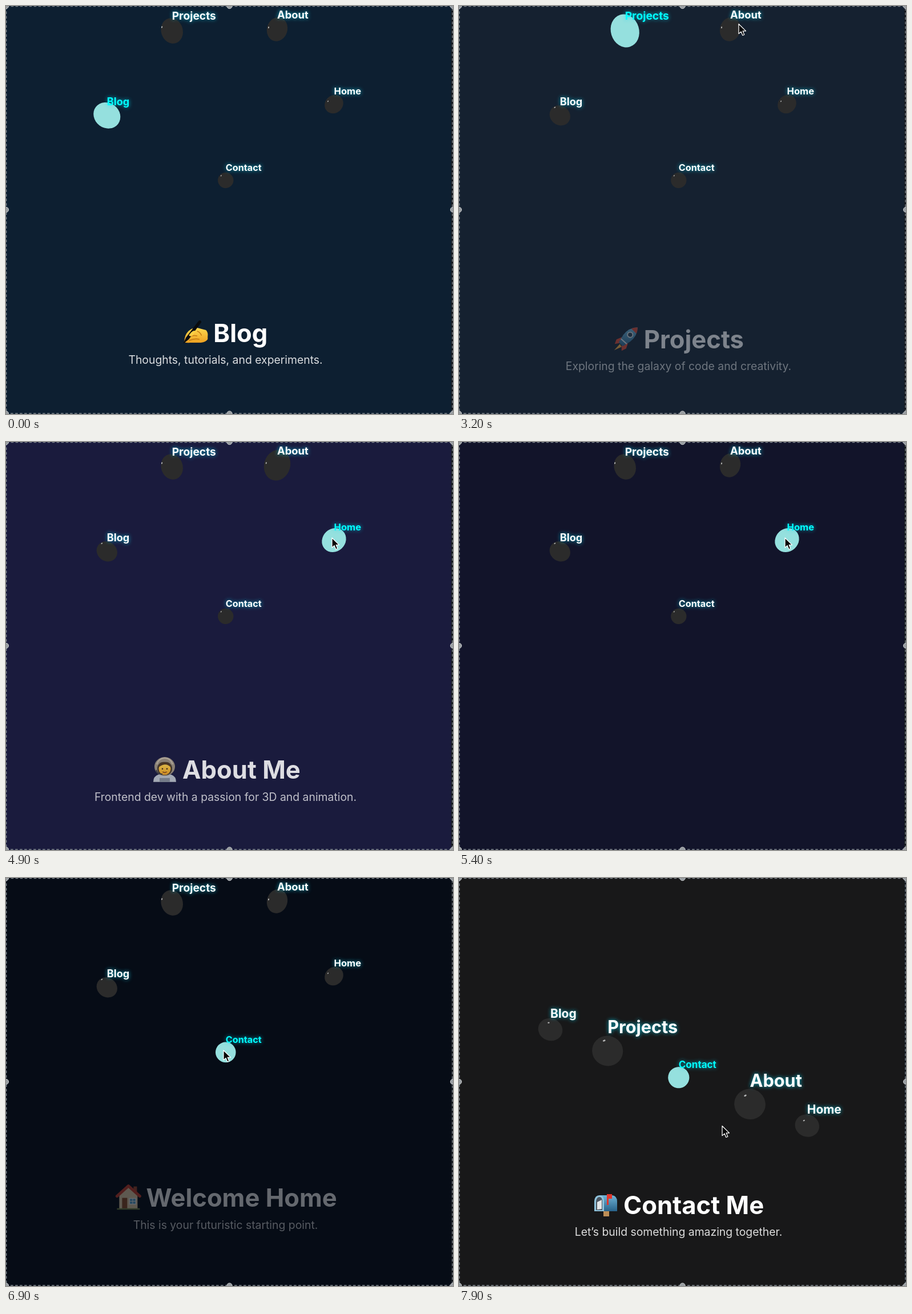
Write an HTML page that moves like this. It is 783 px wide and 715 px high and loops after 8000 ms.

```html
<!DOCTYPE html>
<html lang="en">
<head>
<meta charset="utf-8">
<title>Orbit menu</title>
<style>
  html, body { margin: 0; width: 100%; height: 100%; overflow: hidden; background: #0d1f31; }
  svg { display: block; width: 100vw; height: 100vh; }
  text { font-family: Inter, "Open Sans", sans-serif; font-optical-sizing: none; }
  .label { font-weight: 700; filter: drop-shadow(0 0 3.5px rgba(0, 225, 255, .7)); }
  .title { font-weight: 700; font-size: 43.6px; fill: #fff; }
  .sub { font-size: 19.36px; fill: #fff; fill-opacity: .85; text-anchor: middle; }
</style>
</head>
<body>
<svg id="stage" viewBox="0 0 783 715">
  <defs>
    <linearGradient id="skin" x1="0" y1="0" x2="0" y2="1">
      <stop offset="0" stop-color="#ffd94f"/><stop offset="1" stop-color="#eda021"/>
    </linearGradient>
    <linearGradient id="steel" x1="0" y1="0" x2="0" y2="1">
      <stop offset="0" stop-color="#6fb4d6"/><stop offset="1" stop-color="#28628a"/>
    </linearGradient>

    <g id="hand">
      <path d="M-20 17Q-20 5-13-2Q-6-9 3-8L18-4Q22 0 21 7V12Q18 17 9 18H-10Q-16 19-20 17Z" fill="url(#skin)"/>
      <path d="M-13 9Q-5 4 2 6M-11 14Q-2 10 6 12M3-2Q8 0 10 5" fill="none" stroke="#c67c15" stroke-width="1.6" stroke-linecap="round"/>
      <path d="M5-20Q9-23 10-18L-12 12L-22 20L-17 9Z" fill="#090b0e"/>
      <path d="M-8 0Q-3-5 0-2L-6 6Q-10 8-12 5Z" fill="#ffcf45"/>
    </g>

    <g id="rocket">
      <path d="M-5-4L-17 1L-20 9L-9 7ZM4 5L0 17L-8 21L-8 10Z" fill="#d8432f"/>
      <path d="M-11 9L-21 20L-8 14Z" fill="#f2a63b"/>
      <path d="M20-20Q5-20-5-7L-13 6L-6 13L7 5Q20-5 20-20Z" fill="url(#steel)"/>
      <path d="M20-20Q14-20 9-18L18-9Q20-14 20-20Z" fill="#d8432f"/>
      <path d="M-9 0L1 9" stroke="#d8dde0" stroke-width="2"/>
      <circle cx="7" cy="-7" r="4.6" fill="#273b4d" stroke="#d8dde0" stroke-width="1.8"/>
    </g>

    <g id="astronaut">
      <path d="M-20 22Q-20 12-11 9H11Q20 12 20 22Z" fill="#bcc2c9"/>
      <path d="M-9 15H9V22H-9Z" fill="#858d97"/>
      <ellipse cy="-5" rx="18" ry="16.5" fill="#9d927f"/>
      <path d="M-14-9Q-10-20 0-20T14-9" fill="none" stroke="#c4b9a4" stroke-width="2.4"/>
      <rect x="-13" y="-13" width="26" height="23" rx="11" fill="#4b3d2c"/>
      <ellipse cy="-1" rx="10.5" ry="10.5" fill="url(#skin)"/>
      <path d="M-10-4Q-9-12 0-12T10-4Q6-9 0-8.5T-10-4Z" fill="#53391f"/>
      <circle cx="-4" cy="-1" r="1.3" fill="#3b2914"/><circle cx="4" cy="-1" r="1.3" fill="#3b2914"/>
      <path d="M-3.5 4Q0 7 3.5 4" fill="none" stroke="#8a4b18" stroke-width="1.5"/>
      <path d="M-15 1Q-13 9-4 8" fill="none" stroke="#3a3d41" stroke-width="1.8"/>
    </g>

    <g id="house">
      <rect x="9" y="-19" width="6" height="13" fill="#a5492f"/>
      <path d="M-16 20V-4L0-17L16-4V20Z" fill="#f0d9b0"/>
      <path d="M-20-2L0-20L20-2" fill="none" stroke="#d0402d" stroke-width="5" stroke-linejoin="round" stroke-linecap="round"/>
      <rect x="-11" y="1" width="9" height="19" fill="#914f2b"/>
      <rect x="2" y="2" width="11" height="10" fill="#59abd9" stroke="#fff" stroke-width="1.4"/>
      <path d="M7.5 2V12M2 7H13" stroke="#fff"/>
      <path d="M-20 20.5H20" stroke="#77864a" stroke-width="2.5"/>
    </g>

    <g id="mailbox">
      <rect x="-4" y="10" width="10" height="11" fill="#bd8d55"/>
      <path d="M-11-16H11Q20-15 20-5V12H-11Z" fill="url(#steel)"/>
      <path d="M-20 12V-6Q-19-16-11-16T-3-6V12Z" fill="#8fc3dc"/>
      <path d="M-17 10V-5Q-16-13-11-13T-6-5V10Z" fill="#4b5560"/>
      <path d="M-15 9V-4L-7-8V8Z" fill="#e3e6e8"/>
      <path d="M2 1V-18H11V-10H5V1Z" fill="#e2352b"/>
    </g>
  </defs>

  <rect id="bg" width="783" height="715"/>
  <g id="nodes"></g>
  <g id="pages"></g>
  <g id="frame">
    <path d="M781.5 0V715" stroke="#14181d" stroke-width="3"/>
    <rect x=".7" y=".7" width="781.3" height="713.3" fill="none" stroke="#7d858c" stroke-width="1.3" stroke-dasharray="4.5 3.5"/>
  </g>
  <path id="cursor" d="M0 0V18L4.3 14.2L7.2 21L10.3 19.7L7.5 13H13.2Z" fill="#050505" stroke="#fff" stroke-width="1.3" stroke-linejoin="round"/>
</svg>
<script>
const LOOP = 8000, CX = 385, CY = 350;
const byId = id => document.getElementById(id);
const lerp = (a, b, u) => a + (b - a) * u;
const progress = (t, start, length) => Math.min(1, Math.max(0, (t - start) / length));
const ease = u => u * u * (3 - 2 * u);

function add(parent, tag, attrs, text = "") {
  const el = document.createElementNS("http://www.w3.org/2000/svg", tag);
  set(el, attrs);
  el.textContent = text;
  return parent.appendChild(el);
}
function set(el, attrs) {
  for (const key in attrs) el.setAttribute(key, attrs[key]);
}

// Pose: x, y, radius, label size, highlight offset; before and after the orbit drag.
const nodes = [
  { name: "Projects", on: 1750, off: 3950, from: [290.7, 43.5, 19, 19.2, -17.6, -6.5], to: [260.2, 303, 26.3, 30.6, -6, -18] },
  { name: "About", on: 3280, off: 4870, from: [475, 40.7, 17.9, 18.4, -15, -3], to: [509.5, 396.3, 26.6, 30.7, -8, -15] },
  { name: "Blog", on: -999, off: 2450, from: [176.8, 191.8, 16.8, 18.1, -9, -14], to: [160, 265.6, 19.5, 21, -3, -12] },
  { name: "Home", on: 4680, off: 6610, from: [574.5, 172, 15.3, 16.6, -10.5, -5], to: [609.8, 434, 19.5, 20.9, -5.5, -9] },
  { name: "Contact", on: 6000, off: 9999, from: [384.8, 305.4, 13.7, 16.2, -8, -8], to: [384.8, 349.7, 14.3, 17, -5, -8] }
];

const pages = [
  { icon: "hand", title: "Blog", sub: "Thoughts, tutorials, and experiments.", x: 363.3, enter: -999, exit: 2450 },
  { icon: "rocket", title: "Projects", sub: "Exploring the galaxy of code and creativity.", x: 323.8, enter: 2970, exit: 3950 },
  { icon: "astronaut", title: "About Me", sub: "Frontend dev with a passion for 3D and animation.", x: 309, enter: 4460, exit: 4850 },
  { icon: "house", title: "Welcome Home", sub: "This is your futuristic starting point.", x: 245.4, enter: 5500, exit: 6610 },
  { icon: "mailbox", title: "Contact Me", sub: "Let’s build something amazing together.", x: 288, enter: 7130, exit: 9999 }
];

const backdrop = [
  [0, 13, 31, 49], [2450, 13, 31, 49], [3200, 21, 33, 48], [3600, 25, 35, 49], [3950, 25, 35, 49],
  [4800, 26, 27, 61], [4900, 26, 27, 61], [5800, 11, 14, 27], [6200, 5, 11, 21], [6650, 5, 11, 21],
  [6900, 6, 12, 22], [7600, 24, 24, 25], [8000, 24, 24, 25]
];

const pointer = [
  [1300, -16, 120], [1780, 287, 44], [2700, 287, 44], [3200, 490, 31.5], [3400, 474, 41], [4350, 474, 41],
  [4750, 571, 168], [5400, 571, 168], [5800, 431, 274], [6100, 381, 302], [7250, 381, 302], [7880, 461, 434.5], [8000, 461, 434.5]
];

// Value of a keyed track [time, ...values] at time t.
function track(keys, t, curve = u => u) {
  const i = keys.findIndex(k => k[0] > t);
  if (i < 0) return keys[keys.length - 1].slice(1);
  if (i === 0) return keys[0].slice(1);
  const a = keys[i - 1], b = keys[i];
  const u = curve((t - a[0]) / (b[0] - a[0]));
  return a.slice(1).map((v, j) => lerp(v, b[j + 1], u));
}

for (const n of nodes) {
  const g = add(byId("nodes"), "g", {});
  n.ball = add(g, "ellipse", {});
  n.spark = add(g, "ellipse", { fill: "#e4e6e6", "fill-opacity": .75 });
  n.label = add(g, "text", { class: "label" }, n.name);
}
for (const p of pages) {
  p.group = add(byId("pages"), "g", {});
  add(p.group, "use", { href: "#" + p.icon, x: p.x - 31, y: 572 });
  add(p.group, "text", { class: "title", x: p.x, y: 588.5 }, p.title);
  add(p.group, "text", { class: "sub", x: 384.5, y: 627 }, p.sub);
}
for (const x of [0, 391.5, 783])
  for (const y of [0, 357, 714.5])
    if (x !== 391.5 || y !== 357)
      add(byId("frame"), "circle", { cx: x, cy: y, r: 4.6, fill: "#989da1", stroke: "#c3c6c8", "stroke-width": 1 });

// Blend the two poses in view space so that depth scales the motion.
function pose({ from, to }, u) {
  const depth = lerp(1 / from[3], 1 / to[3], u);
  const blend = (i, origin) => lerp((from[i] - origin) / from[3], (to[i] - origin) / to[3], u) / depth;
  return { x: CX + blend(0, CX), y: CY + blend(1, CY), r: blend(2, 0), size: 1 / depth, hx: blend(4, 0), hy: blend(5, 0) };
}

function drawNode(n, t, turn) {
  const { x, y, r, size, hx, hy } = pose(n, turn);
  const lit = t >= n.on && t < n.off;
  const grow = 1 + .3 * (ease(progress(t, n.on, 200)) - ease(progress(t, n.off, 200)));
  const dx = x - CX, dy = y - CY;
  const stretch = 1 + 1.8e-6 * (dx * dx + dy * dy);
  const angle = Math.atan2(dy, dx) * 180 / Math.PI;
  set(n.ball, {
    rx: r * grow * stretch, ry: r * grow, fill: lit ? "#95e0de" : "#2b2b2b",
    transform: `translate(${x} ${y}) rotate(${angle})`
  });
  const tilt = Math.atan2(hy, hx) * 180 / Math.PI + 90;
  set(n.spark, {
    rx: r * .09, ry: r * .055, opacity: lit ? 0 : 1,
    transform: `translate(${x + hx * grow} ${y + hy * grow}) rotate(${tilt})`
  });
  set(n.label, { x, y: y - size, "font-size": size, fill: lit ? "#0ff" : "#fff" });
}

function drawPage(p, t) {
  const shown = ease(progress(Math.min(t, p.exit), p.enter, 500));
  const gone = ease(progress(t, p.exit, 500));
  set(p.group, {
    opacity: shown * (1 - gone),
    transform: `translate(0 ${lerp(20 * (1 - shown), -20, gone)})`
  });
}

function draw(t) {
  byId("bg").setAttribute("fill", `rgb(${track(backdrop, t).map(Math.round)})`);
  const turn = ease(progress(t, 7250, 630));
  nodes.forEach(n => drawNode(n, t, turn));
  pages.forEach(p => drawPage(p, t));
  const [x, y] = track(pointer, t, ease);
  byId("cursor").setAttribute("transform", `translate(${x} ${y}) scale(.95)`);
}

const start = performance.now();
function tick() {
  draw((performance.now() - start) % LOOP);
  requestAnimationFrame(tick);
}
tick();
</script>
</body>
</html>
```
